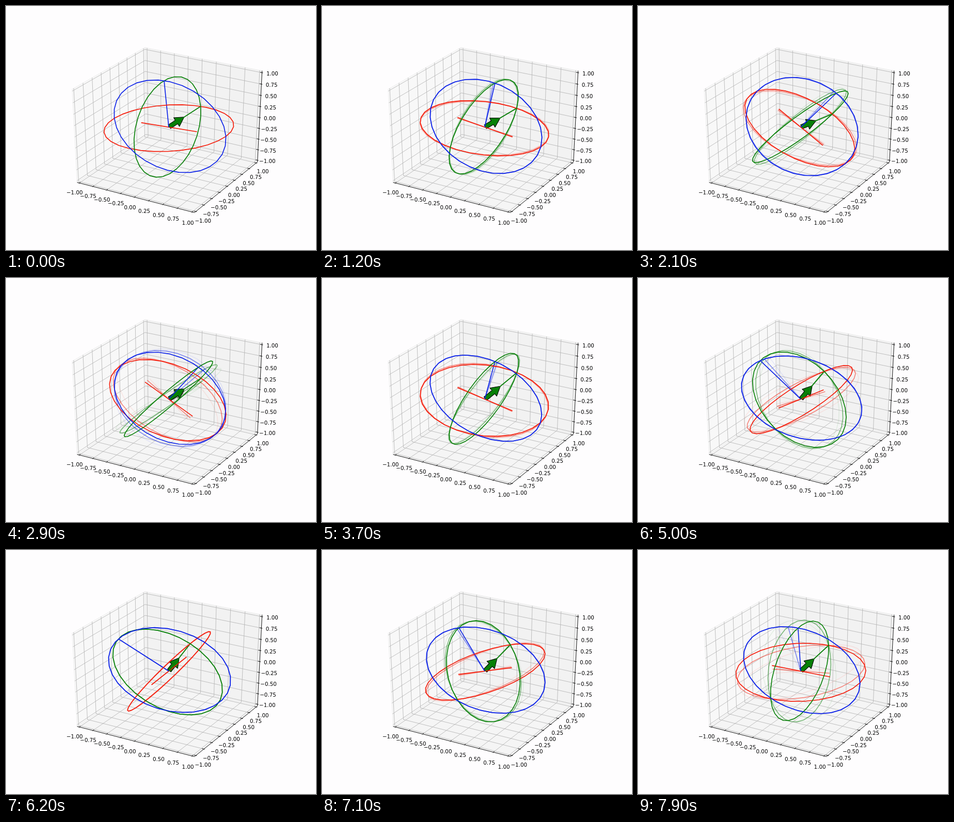
Animation, 600 px wide and 474 px high, one loop 8 s. Source, as an HTML page with a canvas:

```html
<!DOCTYPE html>
<html lang="en">
<head>
<meta charset="utf-8">
<title>Rotating frame</title>
<style>
  html, body { margin: 0; width: 100%; height: 100%; overflow: hidden; background: #fefdfe; }
  canvas { display: block; width: 600px; height: 474px; }
</style>
</head>
<body>
<canvas id="stage" width="600" height="474"></canvas>
<script>
const ctx = document.getElementById('stage').getContext('2d');
const LOOP = 8000, STEP = 100;
const PANE = 1 + 1 / 24;
const RED = '#f51a08', GREEN = '#078007', BLUE = '#0a20e8';
const TICKS = Array.from({ length: 9 }, (_, i) => -1 + i / 4);

// Turning points of the hand-held motion: [seconds, value].
// Roll about the body y axis is in degrees; lean and tilt are that axis' x and z parts.
const ROLL = [
  [0, -5], [1.2, 8.5], [2.65, 40], [2.9, 31.2], [3.2, 6], [3.5, 18], [3.7, 14.5],
  [4.4, -5], [5, -38.5], [5.25, -47], [6.2, -52.5], [7.2, -22], [7.6, -26], [7.9, 0], [8.2, 16]
];
const LEAN = [[0, 0.01], [3.6, 0.02], [5, -0.137], [5.8, -0.18], [7.9, -0.06]];
const TILT = [[0, -0.01], [1.2, -0.054], [2.65, -0.23], [2.9, 0], [3.5, 0.13], [8, 0.09]];

const dot = (a, b) => a[0] * b[0] + a[1] * b[1] + a[2] * b[2];
const cross = (a, b) => [
  a[1] * b[2] - a[2] * b[1], a[2] * b[0] - a[0] * b[2], a[0] * b[1] - a[1] * b[0]
];
const mix = (a, s, b, t) => a.map((v, i) => v * s + b[i] * t);
const unit = a => a.map(v => v / Math.hypot(...a));

// Perspective view: elevation 30, azimuth -60
const H = Math.sqrt(3) / 2;
const RIGHT = [H, 0.5, 0], UP = [-0.25, H / 2, H], EYE = [H / 2, -0.75, 0.5];
function project(p) {
  const depth = 1 - dot(EYE, p) / 20;
  return [315 + 125.8 * dot(RIGHT, p) / depth, 235.3 - 99.25 * dot(UP, p) / depth];
}

function trace(points, closed) {
  ctx.beginPath();
  points.forEach(p => ctx.lineTo(...p));
  if (closed) ctx.closePath();
}

function line(points, color, width, closed) {
  trace(points.map(project), closed);
  ctx.strokeStyle = color;
  ctx.lineWidth = width;
  ctx.stroke();
}

function pane(points, color) {
  trace(points.map(project), true);
  ctx.fillStyle = color;
  ctx.fill();
  ctx.strokeStyle = '#efefef';
  ctx.lineWidth = 1;
  ctx.stroke();
}

function label(value, p, dx, dy) {
  const [x, y] = project(p);
  ctx.fillText(value.toFixed(2).replace('-', '\u2212'), x + dx, y + dy + 3.7);
}

function drawAxes() {
  const P = PANE, IN = P - 0.033, OUT = P + 0.017, L = 1.187, Z = 1.15;
  ctx.fillStyle = '#fefdfe';
  ctx.fillRect(0, 0, 600, 474);
  pane([[-P, -P, -P], [-P, P, -P], [-P, P, P], [-P, -P, P]], '#f8f8f8');
  pane([[-P, P, -P], [P, P, -P], [P, P, P], [-P, P, P]], '#f2f2f2');
  pane([[-P, -P, -P], [P, -P, -P], [P, P, -P], [-P, P, -P]], '#f5f5f5');
  for (const v of TICKS) {
    line([[v, -P, -P], [v, P, -P], [v, P, P]], '#b4b4b4', 0.85);
    line([[P, v, -P], [-P, v, -P], [-P, v, P]], '#b4b4b4', 0.85);
    line([[-P, -P, v], [-P, P, v], [P, P, v]], '#b4b4b4', 0.85);
  }
  line([[-P, -P, -P], [P, -P, -P], [P, P, -P], [P, P, P]], '#000', 0.9);
  ctx.font = '10.3px "DejaVu Sans", sans-serif';
  ctx.textAlign = 'center';
  ctx.fillStyle = '#000';
  for (const v of TICKS) {
    line([[v, -IN, -P], [v, -OUT, -P]], '#000', 0.9);
    line([[IN, v, -P], [OUT, v, -P]], '#000', 0.9);
    line([[IN, P, v], [OUT, P, v]], '#000', 0.9);
    label(v, [v, -L, -L], 0.8 + 0.7 * v, 0.5 + v);
    label(v, [L, v, -L], -2.5, 1);
    label(v, [Z, Z, v], 1.4, 3.8);
  }
}

// Smooth curve through key points that never overshoots them
function curve(keys, t) {
  const last = keys.length - 1;
  let i = 0;
  while (i < last - 1 && keys[i + 1][0] <= t) i++;
  const rate = k => k < 0 || k >= last
    ? 0 : (keys[k + 1][1] - keys[k][1]) / (keys[k + 1][0] - keys[k][0]);
  const slope = k => {
    const p = rate(k - 1), q = rate(k);
    return p * q > 0 ? 2 * p * q / (p + q) : 0;
  };
  const [t0, a] = keys[i], [t1, b] = keys[i + 1];
  const span = t1 - t0, s = Math.min((t - t0) / span, 1), d = b - a;
  const m0 = slope(i) * span, m1 = slope(i + 1) * span;
  return a + s * (m0 + s * (3 * d - 2 * m0 - m1 + s * (m0 + m1 - 2 * d)));
}

function bodyAxes(time) {
  const t = time / 1000;
  const roll = curve(ROLL, t) * Math.PI / 180;
  const x = curve(LEAN, t), z = curve(TILT, t);
  const Y = [x, Math.sqrt(1 - x * x - z * z), z];
  const up = [Math.sin(roll), 0, Math.cos(roll)];
  const Z = unit(mix(up, 1, Y, -dot(up, Y)));
  return [cross(Y, Z), Y, Z];
}

function ring(a, b, color) {
  const points = Array.from({ length: 30 }, (_, i) => {
    const angle = i * Math.PI / 15;
    return mix(a, Math.cos(angle), b, Math.sin(angle));
  });
  line(points, color, 1.65, true);
}

function arrow(axis) {
  const from = project([0, 0, 0]), to = project(axis.map(v => v / 2));
  const dx = to[0] - from[0], dy = to[1] - from[1];
  const tip = Math.hypot(dx, dy) - 2, neck = tip - 17.5;
  ctx.save();
  ctx.translate(...from);
  ctx.rotate(Math.atan2(dy, dx));
  trace([[1.5, -4.2], [neck, -4.2], [neck, -10.2], [tip, 0],
         [neck, 10.2], [neck, 4.2], [1.5, 4.2]], true);
  ctx.fillStyle = GREEN;
  ctx.fill();
  ctx.strokeStyle = '#000';
  ctx.lineWidth = 1;
  ctx.stroke();
  ctx.restore();
}

function drawBody(t, alpha) {
  const [X, Y, Z] = bodyAxes(t), O = [0, 0, 0];
  ctx.globalAlpha = alpha;
  arrow(Y);
  line([X.map(v => -v / 2), X.map(v => v / 2)], RED, 1.65);
  line([O, Y], GREEN, 1.65);
  line([O, Z], BLUE, 1.65);
  ring(X, Y, RED);
  ring(Y, Z, GREEN);
  ring(X, Z, BLUE);
  ctx.globalAlpha = 1;
}

function draw(now) {
  const t = Math.floor((now % LOOP) / STEP) * STEP;
  drawAxes();
  // Fading afterimages of the two preceding steps
  if (t >= 2 * STEP) drawBody(t - 2 * STEP, 0.08);
  if (t >= STEP) drawBody(t - STEP, 0.5);
  drawBody(t, 1);
}

ctx.lineJoin = 'round';
function tick() {
  draw(performance.now());
  requestAnimationFrame(tick);
}
tick();
</script>
</body>
</html>
```
